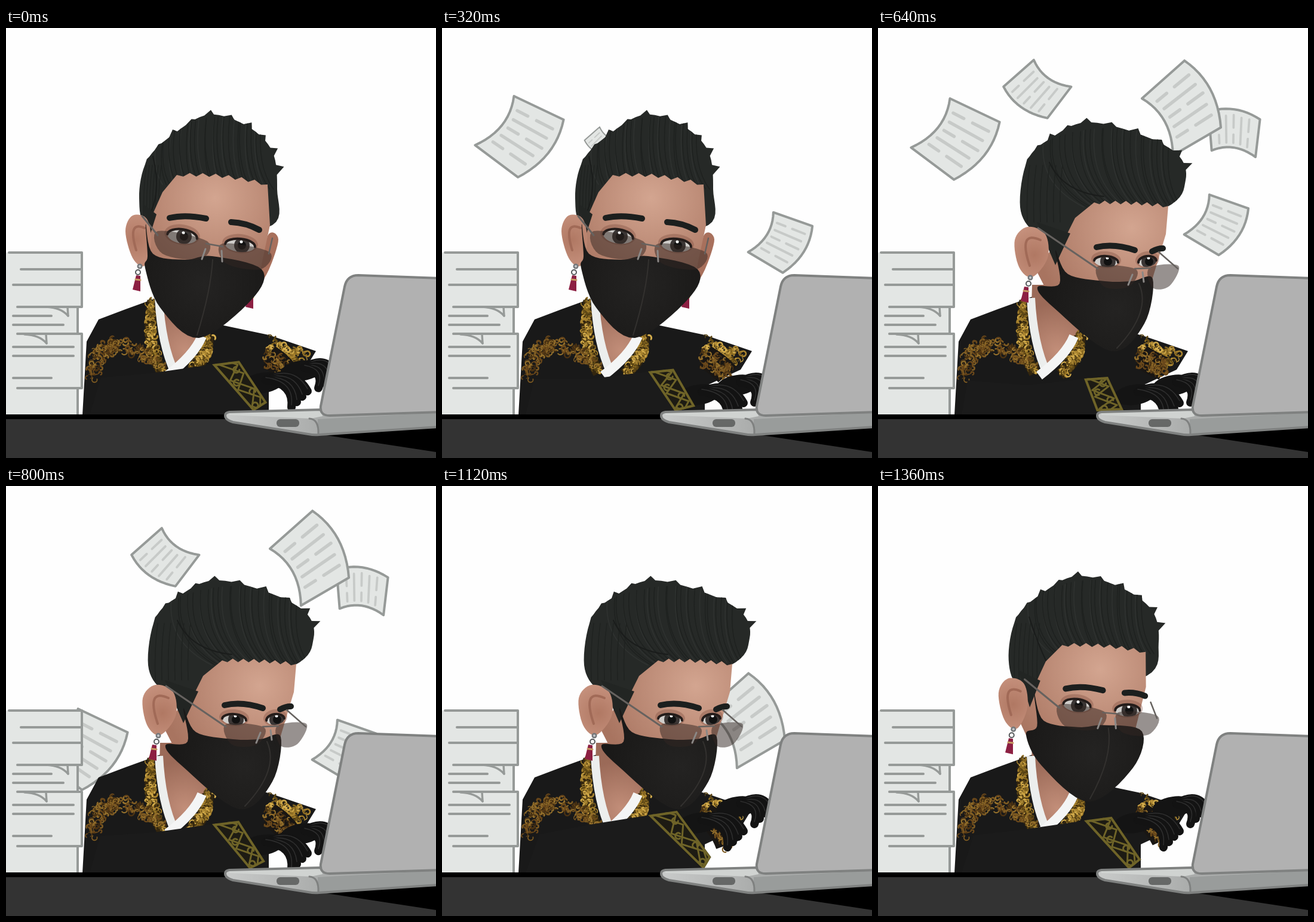
Animation of 720x720 px, one loop 1440 ms. Source, as an HTML page with a canvas:

```html
<!DOCTYPE html>
<html lang="en">
<head>
<meta charset="utf-8">
<title>Busy at the desk</title>
<style>
html, body { margin: 0; width: 100%; height: 100%; overflow: hidden; background: #fefefe; }
canvas { display: block; width: 100vw; height: 100vh; }
</style>
</head>
<body>
<canvas id="stage" width="720" height="720"></canvas>
<script>
const ctx = document.getElementById('stage').getContext('2d');
const LOOP = 1440, STEP = 80;
const GOLD = ['#8a6a22', '#a8832f', '#5d4716', '#d3ac4c'];
const BRONZE = ['#6a481b', '#7d5a22', '#4a3213', '#94702c'];

// Every sheet has the same form; side tells which way it bends
const PAPERS = [
  { peak: 480, x: 131, y: 168, angle: 31, size: 113, side: 1, fall: 17 },
  { peak: 542, x: 568, y: 326, angle: 25, size: 85, side: 1, fall: 17 },
  { peak: 640, x: 267, y: 103, angle: -47, size: 83, side: -1, fall: 17 },
  { peak: 702, x: 596, y: 174, angle: -89, size: 80, side: 1, fall: 8 },
  { peak: 800, x: 510, y: 122, angle: -36, size: 117, side: 1, fall: 17 }
];

const lerp = (a, b, k) => a + (b - a) * k;
const mix = (a, b, k) => a.map((v, i) => lerp(v, b[i], k));
const span = (t, from, to) => Math.max(0, Math.min(1, (t - from) / (to - from)));
const ease = k => k * k * (3 - 2 * k);

function random(seed) {
  return () => (seed = (seed * 16807) % 2147483647) / 2147483647;
}

function poseAt(t) {
  const later = t < 640 ? t + LOOP : t;
  return {
    turn: ease(span(t, 320, 640)) * (1 - span(t, 1120, 1440) ** 2),
    lift: ease(span(later, 640, 960)) * (1 - span(later, 960, 2080)),
    reach: ease(span(later, 640, 1120)) * (1 - span(later, 1360, 1920)) ** 6
  };
}

// Closed Catmull-Rom curve through the key points, as a sampled outline
function spline(p, samples = 8) {
  const n = p.length / 2, out = [];
  for (let i = 0; i < n; i++) {
    for (let j = 0; j < samples; j++) {
      const u = j / samples;
      for (const axis of [0, 1]) {
        const [a, b, c, d] = [-1, 0, 1, 2].map(o => p[(i + o + n) % n * 2 + axis]);
        out.push(b + .5 * u * (c - a + u * (2 * a - 5 * b + 4 * c - d + u * (3 * (b - c) + d - a))));
      }
    }
  }
  return out;
}

function trace(p, closed = true) {
  ctx.beginPath();
  for (let i = 0; i < p.length; i += 2) ctx.lineTo(p[i], p[i + 1]);
  if (closed) ctx.closePath();
}

function fill(p, color) {
  trace(p);
  ctx.fillStyle = color;
  ctx.fill();
}

function line(p, color, width) {
  trace(p, false);
  ctx.strokeStyle = color;
  ctx.lineWidth = width;
  ctx.stroke();
}

function curve([x0, y0, cx, cy, x1, y1], color, width, cap = 'round') {
  ctx.beginPath();
  ctx.moveTo(x0, y0);
  ctx.quadraticCurveTo(cx, cy, x1, y1);
  ctx.lineCap = cap;
  ctx.strokeStyle = color;
  ctx.lineWidth = width;
  ctx.stroke();
  ctx.lineCap = 'round';
}

function disc(x, y, rx, ry, color, angle = 0) {
  ctx.beginPath();
  ctx.ellipse(x, y, rx, ry, angle, 0, Math.PI * 2);
  ctx.fillStyle = color;
  ctx.fill();
}

function clipped(p, draw) {
  ctx.save();
  trace(p);
  ctx.clip();
  draw();
  ctx.restore();
}

function radial(x, y, r, inner, outer) {
  const g = ctx.createRadialGradient(x, y, 0, x, y, r);
  g.addColorStop(0, inner);
  g.addColorStop(1, outer);
  return g;
}

// Gold scrollwork scattered along a curve
function ornate([x0, y0, cx, cy, x1, y1], spread, count, colors) {
  const rnd = random(count * 31 + spread);
  for (let i = 0; i < count; i++) {
    const u = rnd(), a = rnd() * 6.3, r = spread * Math.sqrt(rnd()), turn = rnd() * 6.3;
    const x = lerp(lerp(x0, cx, u), lerp(cx, x1, u), u) + r * Math.cos(a);
    const y = lerp(lerp(y0, cy, u), lerp(cy, y1, u), u) + r * Math.sin(a);
    ctx.beginPath();
    ctx.arc(x, y, 2 + rnd() * 3, turn, turn + 2 + rnd() * 2.5);
    ctx.strokeStyle = colors[i % colors.length];
    ctx.lineWidth = 1.2 + rnd() * 1.8;
    ctx.stroke();
  }
}

function drawPaper({ peak, x, y, angle, size, side, fall }, t) {
  const scale = span(t, peak - 380, peak - 260);
  const away = Math.abs(t - peak) / 160;
  const drop = t < peak ? 13 * away ** 2.75 : fall * away ** 4;
  if (!scale || drop > 800) return;
  const at = (s, v) => {
    const down = (v - .5) * size * (1 + .08 * side * (2 * s - 1));
    return [(s - .5) * size * .8 + side * (size * .52 * v * (1 - v) - size * .045 - down * .13), down];
  };
  const outline = [];
  for (let i = 0; i <= 12; i++) outline.push(...at(1, i / 12));
  for (let i = 12; i >= 0; i--) outline.push(...at(0, i / 12));
  ctx.save();
  ctx.translate(x, y + drop);
  ctx.scale(scale, scale);
  ctx.rotate(angle * Math.PI / 180);
  fill(outline, '#e3e6e4');
  line(outline.concat(outline.slice(0, 2)), '#969a98', 4);
  for (let row = 0; row < 5; row++) {
    const dashes = row % 2 ? [[.12, .82]] : [[.12, .34], [.52, .85]];
    for (const [from, to] of dashes) {
      line([...at(from, .18 + row * .155), ...at(to, .18 + row * .155)], '#c7cac8', size * .047);
    }
  }
  ctx.restore();
}

function drawBody() {
  fill([128,648, 135,525, 155,488, 200,471, 258,450, 350,495, 440,514, 519,541, 500,572, 440,600, 440,648], '#191919');
  fill([258,430, 348,430, 335,522, 285,580, 256,500], radial(300, 540, 80, '#c28e79', '#9b6a58'));
  for (const band of [[246,457, 232,525, 262,578], [338,514, 340,555, 305,580]]) {
    curve(band, '#33260f', 19, 'butt');
    ornate(band, 9, 110, GOLD);
  }
  curve([256,452, 260,530, 283,578], '#eceeed', 14, 'butt');
  curve([328,516, 315,548, 270,582], '#f4f5f5', 16, 'butt');
  ornate([147,582, 150,495, 255,560], 14, 170, BRONZE);
  ornate([450,530, 465,565, 490,545], 17, 130, GOLD);
}

function drawHand(x, y, length, droop) {
  disc(x, y, 36, 17, '#141414', -.15);
  for (let i = 0; i < 4; i++) {
    const bend = [x + 5, y - 5, x + length * .7, y - 26 + 9 * i, x + length - 9 * i, y + droop + 9 * i];
    curve(bend, '#131313', 14);
    curve(bend.map((v, j) => j % 2 ? v - 4 : v), '#2f2f2f', 1.5);
  }
}

function drawHands({ lift, reach }) {
  const cuff = [440, 550, 465, 565, 478, lerp(570, 606, lift)];
  curve(cuff, '#191613', 40, 'butt');
  ornate(cuff, 16, 80, BRONZE);
  drawHand(495, lerp(598, 537, reach), 55, 2);
  drawHand(430, lerp(614, 564, reach), 75, 14);
}

function drawSleeve(k) {
  const sleeve = mix([140,648, 150,590, 250,598, 348,587, 385,648], [140,648, 165,582, 245,562, 348,545, 449,648], k);
  fill(sleeve, '#1b1b1b');
  const cuff = mix([345,587, 385,584, 411,640, 366,642], [345,545, 395,537, 457,618, 450,642], k);
  fill(cuff, '#1d1b13');
  clipped(cuff, () => {
    const [ax, ay, bx, by, cx, cy, dx, dy] = cuff;
    const at = (s, v) => [lerp(lerp(ax, dx, v), lerp(bx, cx, v), s), lerp(lerp(ay, dy, v), lerp(by, cy, v), s)];
    const olive = '#6f6428';
    line(cuff.concat(cuff.slice(0, 2)), olive, 8);
    for (const shift of [0, .2]) {
      const zigzag = [];
      for (let i = 0; i < 6; i++) zigzag.push(...at(i % 2 ? .85 : .15, i * .28 - shift));
      line(zigzag, olive, 3);
    }
    for (let i = 0; i < 4; i++) {
      ctx.beginPath();
      ctx.arc(...at(i % 2 ? .32 : .68, .18 + i * .25), 5, i, i + 4.4);
      ctx.stroke();
    }
  });
}

function drawEarring(x, y, k) {
  disc(x, y, 4.5, 4.5, '#74777a');
  disc(x, y, 2, 2, '#c5c8ca');
  ctx.beginPath();
  ctx.arc(x - 3, y + 10, 4, 0, 7);
  ctx.strokeStyle = '#55585a';
  ctx.lineWidth = 2;
  ctx.stroke();
  const tip = x - lerp(5, 9, k);
  fill([tip - 1, y + 15, tip + 6, y + 16, tip + 6, y + 42, tip - 7, y + 39], '#8c1f42');
  line([tip - 2, y + 22, tip + 6, y + 23], '#c79a63', 3);
}

function drawEye([x, y, rx, ry, tilt]) {
  disc(x, y - 3, rx + 5, ry + 5, 'rgba(120,72,58,.35)', tilt);
  ctx.save();
  ctx.beginPath();
  ctx.ellipse(x, y, rx, ry, tilt, 0, 7);
  ctx.clip();
  ctx.fillStyle = '#cfcdca';
  ctx.fill();
  disc(x + 3, y, 13, 13, '#3b3635');
  disc(x + 3, y, 7, 7, '#111');
  disc(x + 2, y - 6, 2.5, 2.5, '#fff');
  ctx.restore();
  ctx.beginPath();
  ctx.ellipse(x, y, rx, ry, tilt, Math.PI, Math.PI * 2);
  ctx.strokeStyle = '#241c1a';
  ctx.lineWidth = 4;
  ctx.stroke();
}

function drawHair(k) {
  const outline = spline(mix(
    [240,335, 223,285, 236,222, 280,178, 340,145, 405,165, 446,207, 454,270, 446,330, 330,345],
    [262,342, 238,300, 250,222, 290,184, 348,158, 430,175, 500,210, 515,255, 480,302, 310,362], k));
  const rnd = random(17);
  const [cx, cy] = mix([340,300], [380,310], k);
  for (let i = 16; i < 56; i++) {
    const tuft = rnd() * 9 + 4;
    if (i % 4) continue;
    const x = outline[2 * i] - cx, y = outline[2 * i + 1] - cy, r = Math.hypot(x, y);
    outline[2 * i] += x / r * tuft + 3;
    outline[2 * i + 1] += y / r * tuft;
  }
  fill(outline, '#262927');
  clipped(outline, () => {
    const [tx, ty, ux, uy] = mix([250,185, 425,160], [275,190, 485,190], k);
    const [fx, fy, gx, gy] = mix([262,262, 448,270], [345,300, 505,295], k);
    for (let i = 0; i < 30; i++) {
      const s = i / 29;
      const x0 = lerp(tx, ux, s) + rnd() * 10, y0 = lerp(ty, uy, s) - 22 * Math.sin(s * 3.1);
      const x1 = lerp(fx, gx, s), y1 = lerp(fy, gy, s);
      curve([x0, y0, x0 - 8, lerp(y0, y1, .65), x1, y1], i % 3 ? '#1e211f' : '#2f3230', 1.5);
    }
    const [sx, gap] = mix([235, 5], [254, 11], k);
    for (let i = 0; i < 6; i++) curve([sx + i * gap, 230, sx - 6 + i * gap, 275, sx - 4 + i * gap, 325], '#1f2220', 1.5);
    curve(mix([246,215, 262,280, 236,320], [287,225, 310,275, 378,282], k), '#1a1c1b', 2);
  });
}

function drawFace(k) {
  const side = mix([290,470, 250,420, 228,370, 242,320, 262,275, 286,246], [330,480, 285,445, 262,400, 315,348, 330,318, 362,292], k);
  const jaw = mix([438,262, 442,330, 425,410, 380,470], [486,298, 482,345, 458,425, 430,490], k);
  const [x0, y0] = side.slice(-2), [x1, y1] = jaw;
  const fringe = [];
  for (let i = 1; i < 14; i++) {
    const s = i / 14;
    fringe.push(lerp(x0, x1, s), lerp(y0, y1, s) + (i % 2 ? 3 : -3) - lerp(6, 2, k) * Math.sin(s * Math.PI));
  }
  const [gx, gy] = mix([350,285], [425,335], k);
  fill([...side, ...fringe, ...jaw], radial(gx, gy, 165, '#d3a590', '#a87460'));
  fill(mix([230,295, 252,312, 240,350], [266,325, 322,344, 297,397], k), '#222523');
}

function drawEar(k) {
  const ear = mix([236,320, 212,314, 200,340, 212,385, 232,398, 243,360], [280,345, 250,333, 229,355, 236,400, 258,417, 284,385], k);
  fill(spline(ear), radial(ear[0] - 18, ear[1] + 35, 55, '#b07863', '#c99581'));
  curve(mix([232,335, 203,322, 218,372], [272,355, 234,338, 254,398], k), '#a16a57', 4);
  drawEarring(...mix([224,399], [255,418], k), k);
}

function drawMask(k) {
  const mask = mix(
    [234,328, 246,378, 300,388, 345,382, 428,404, 412,454, 323,519, 258,468, 233,402, 237,382],
    [297,372, 318,412, 380,424, 425,424, 460,420, 446,495, 390,541, 294,468, 267,434, 304,428], k);
  const [x, y] = mix([330,430], [400,470], k);
  fill(spline(mask), radial(x, y, 120, '#242322', '#1a1918'));
  curve(mix([346,388, 343,440, 320,514], [437,428, 458,475, 400,536], k), '#33312f', 2);
}

function drawGlasses(k) {
  const wire = '#66625f', tint = 'rgba(50,38,34,.5)';
  fill(spline(mix([254,340, 337,357, 326,387, 262,378], [368,399, 432,404, 420,433, 378,433], k)), tint);
  fill(spline(mix([362,361, 441,375, 426,404, 368,394], [454,402, 503,398, 488,432, 460,435], k)), tint);
  line(mix([228,315, 254,347], [268,335, 368,403], k), wire, 3);
  line(mix([335,361, 363,366], [430,403, 456,402], k), wire, 2.5);
  line(mix([446,352, 440,378], [470,375, 502,403], k), wire, 2.5);
  line(mix([334,370, 328,387], [426,413, 419,430], k), '#8b8886', 3);
  line(mix([361,373, 362,391], [443,409, 445,425], k), '#8b8886', 3);
}

function drawHead(k) {
  // Halfway through the turn the skull lags behind the features
  const lag = 44 * k * (1 - k);
  ctx.save();
  ctx.translate(-lag, 0);
  drawEarring(...mix([413,428], [425,435], k), k);
  fill(spline(mix([438,348, 456,354, 440,405, 424,424], [430,375, 440,385, 438,410, 425,420], k)), '#a8705c');
  drawHair(k);
  drawFace(k);
  drawEar(k);
  ctx.restore();

  drawEye(mix([295,349, 25,12,.15], [382,391, 20,9,.08], k));
  drawEye(mix([392,364, 25,11,.1], [451,391, 15,9,-.12], k));
  curve(mix([274,318, 300,312, 335,319], [366,367, 395,360, 430,372], k), '#1c1f1e', 10);
  curve(mix([377,325, 402,326, 424,338], [459,374, 468,369, 477,369], k), '#1c1f1e', 10);
  drawMask(k);
  drawGlasses(k);
}

function drawStack() {
  const edge = '#969a98';
  let y = 376;
  for (let i = 0; i < 4; i++) {
    const w = i % 2 ? 120 : 127, h = i % 2 ? 45 : 91;
    ctx.fillStyle = '#e3e6e4';
    ctx.fillRect(0, y, w, h);
    line([w, y, w, y + h], edge, 4);
    y += h;
  }
  line([5, 376, 126, 376], edge, 4);
  for (const seam of [467, 512, 603]) line([19, seam, 126, seam], edge, 4);
  for (const [row, end] of [[404, 126], [430, 126], [482, 76], [497, 96], [534, 113], [549, 113], [586, 76]]) {
    line([row === 404 ? 25 : 12, row, end, row], edge, 4);
  }
  for (const [x, top] of [[67, 467], [31, 513]]) {
    curve([x, top, x + 25, top + 1, x + 37, top + 15], edge, 3.5);
    line([x + 37, top + 15, x + 36, top], edge, 3.5);
  }
}

function drawDesk() {
  ctx.fillStyle = '#333';
  ctx.fillRect(0, 648, 720, 72);
  ctx.fillStyle = '#000';
  ctx.fillRect(0, 647, 720, 8);
  fill([530,681, 720,664, 720,710], '#000');
}

function drawLaptop() {
  const edge = '#7f8180';
  const base = new Path2D('M374 643 L528 639 L724 641 L724 668 L524 681 Q516 682 506 680 L380 660 Q367 656 367 649 Q367 644 374 643Z');
  const shade = ctx.createLinearGradient(367, 0, 524, 0);
  shade.addColorStop(0, '#c9cbca');
  shade.addColorStop(1, '#aaacab');
  ctx.fillStyle = shade;
  ctx.fill(base);
  fill([522,655, 724,644, 724,668, 522,681], '#999c9b');
  fill([374,643, 528,639, 530,650, 510,654, 374,648], '#d0d3d1');
  curve([508,654, 524,655, 523,680], edge, 3);
  ctx.lineWidth = 4;
  ctx.stroke(base);
  const lid = new Path2D('M527 633 L567 433 Q571 414 590 414 L724 419 L724 643 L542 649 Q525 649 527 633Z');
  ctx.fillStyle = '#b1b1b1';
  ctx.fill(lid);
  ctx.stroke(lid);
  ctx.beginPath();
  ctx.roundRect(453, 655, 38, 13, 6);
  ctx.fillStyle = '#666867';
  ctx.fill();
}

function draw(t) {
  const pose = poseAt(t);
  ctx.lineCap = ctx.lineJoin = 'round';
  ctx.fillStyle = '#fefefe';
  ctx.fillRect(0, 0, 720, 720);
  PAPERS.forEach(paper => drawPaper(paper, t));
  drawBody();
  drawHands(pose);
  drawSleeve(pose.lift);
  drawHead(pose.turn);
  drawStack();
  drawDesk();
  drawLaptop();
}

function tick() {
  draw(Math.floor(performance.now() % LOOP / STEP) * STEP);
  requestAnimationFrame(tick);
}
tick();
</script>
</body>
</html>
```
